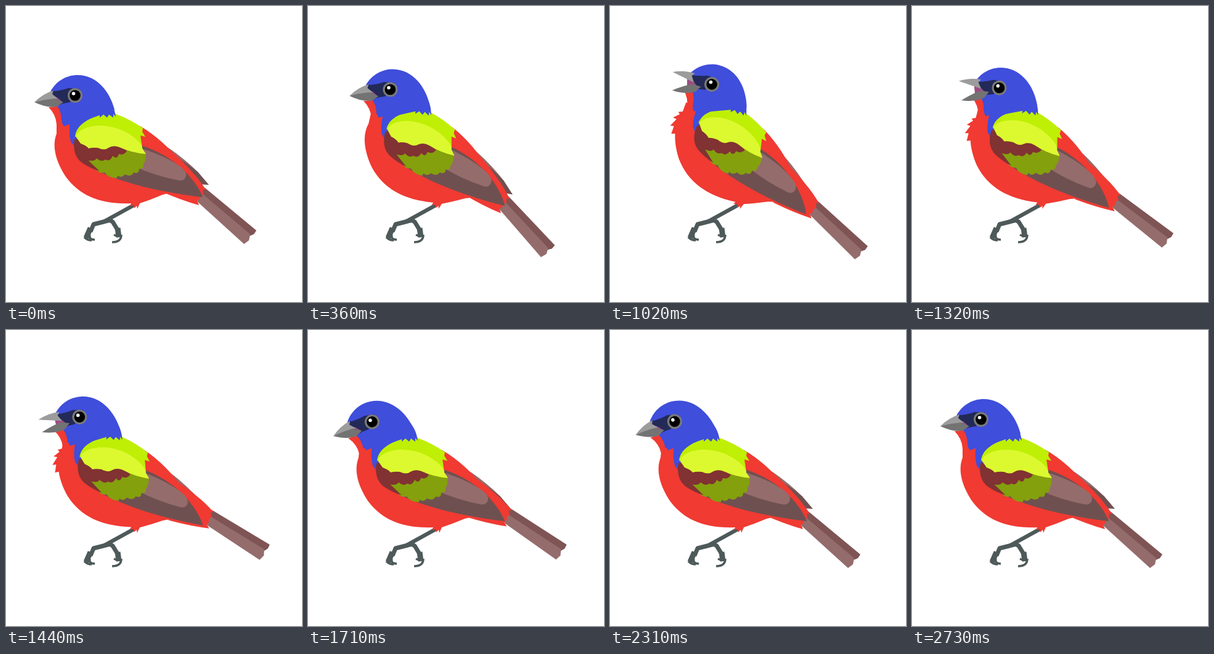
An HTML page for the animation above (3570 ms loop, 480 by 480 pixels).

```html
<!DOCTYPE html>
<html lang="en">
<head>
<meta charset="utf-8">
<title>Singing bird</title>
<style>
  html, body { margin: 0; width: 100%; height: 100%; overflow: hidden; background: #fff; }
  svg { display: block; width: 100%; height: 100%; }
  .red { fill: #f03a32; }
  .blue { fill: #3f4edb; }
  .dark { fill: #6f5050; }
  .light { fill: #946c6c; }
  .leg { fill: none; stroke: #4e5959; stroke-linejoin: round; }
</style>
</head>
<body>
<svg viewBox="0 0 480 480">
  <g class="leg">
    <path stroke-width="6.5" d="M209 322L160 349"/>
    <path stroke-width="7" d="M173 346L154 351 142 354 137 366M166 346L173 350 181 363"/>
    <path stroke-width="9" d="M137 360L130 376M181 360L183 375"/>
    <path stroke-width="3.5" d="M136 371Q134 379 144 379M127 375Q132 380 139 380M175 371L182 374M187 371Q187 383 172 383"/>
  </g>
  <g id="body">
    <path class="light" d="M262 229Q290 248 312 270L300 280Z"/>
    <path class="dark" d="M268 240Q292 253 312 270L329 290 311 289Z"/>
    <g id="tail">
      <path fill="#7f5454" d="M317 291L324 296 406 364 402 370 395 373 314 312Z"/>
      <path class="light" d="M312 303L319 305 396 370 394 380 386 386 310 317Z"/>
      <path class="red" d="M240 214Q270 233 301 268Q314 282 324 298L319 298 320 305 315 308 314 313 310 316 313 323Q284 315 250 300Z"/>
    </g>
    <path class="red" d="M84 185L82 207C74 228 81 252 97 277C120 308 154 322 203 320L201 324 207 323 208 328 212 324 213 329 217 320Q235 314 254 306L280 300 286 256Q255 217 218 195L150 180Z"/>
    <path id="tuft" class="red" d="M92 197L76 203 79 206 70 214 76 215 69 228 75 227 74 240 81 238 95 250 100 200Z"/>
    <g id="throat">
      <path class="red" d="M69 164Q81 176 82 192L82 207 95 210 108 195 90 162Z"/>
    </g>
    <path class="blue" d="M104 188Q101 205 105 220L114 232 130 215 152 177 120 183Z"/>
    <path class="dark" d="M110 220C110 246 124 255 150 268C190 287 250 302 319 310C312 290 282 246 219 226L150 215Z"/>
    <path class="light" d="M216 230Q256 242 281 259Q293 267 292 275Q290 284 281 283Q240 275 208 260Z"/>
    <path fill="#84a00d" d="M140 248L134 251Q136 258 146 264Q148 272 160 270Q166 279 180 279L181 275Q187 280 193 273Q203 278 207 270Q216 273 216 264Q224 265 223 256Q228 250 226 238L185 232Z"/>
    <path fill="#813232" d="M111 216Q107 242 123 254Q136 263 152 268L133 250Q143 253 147 247Q155 254 161 249Q169 253 173 243Q180 250 183 240Q191 243 196 235L178 222 120 214Z"/>
    <path fill="#bfef05" d="M112 212C114 191 137 181 158 175L178 175Q202 184 222 198L221 204 226 212 218 210 221 230 190 222Z"/>
    <path fill="#dcf930" d="M114 213C113 202 134 194 152 194C184 194 208 211 217 222Q221 227 221 231L227 240Q203 238 184 229Q174 225 166 230Q160 235 149 230Q140 229 134 231Q130 226 121 223Z"/>
    <g id="neck">
      <path class="blue" d="M178 180Q175 156 158 144L120 140 85 163Q91 176 91 190L94 195 105 191 122 188 138 182 152 177 152 181 158 176 164 181 167 176 174 181 174 175Z"/>
      <g id="head">
        <path class="blue" d="M72 139C82 120 100 112 116 112C148 112 169 140 176 168L120 180 90 185Q90 171 83 162Z"/>
        <path fill="#232a57" d="M71 143L75 137 80 138Q94 136 101 133L119 134 111 140 104 156 93 158 82 162 74 158Z"/>
        <path fill="#9d4c83" d="M71 144L84 149 92 156 74 160Z"/>
        <path id="upper" fill="#9c9c9c" d="M46 156Q60 142 77 137L75 143 84 150 78 151Z"/>
        <path id="lower" fill="#737373" d="M46 156Q60 152 79 150L93 156 83 163Q67 166 46 156Z"/>
        <circle cx="112" cy="145" r="12" fill="#7a7a7a"/>
        <circle cx="112" cy="145" r="8.8"/>
        <circle cx="109.5" cy="142" r="2.8" fill="#fff"/>
      </g>
    </g>
  </g>
</svg>
<script>
const LOOP = 3570, STEP = 30;
const easeOut = u => 1 - (1 - u) ** 2;
const smooth = u => u * u * (3 - 2 * u);

function pose(id, transform) {
  document.getElementById(id).setAttribute('transform', transform);
}

function draw(now) {
  const time = Math.floor(now % LOOP / STEP) * STEP;
  const ramp = (from, to, ease) =>
    ease(Math.min(1, Math.max(0, (time - from) / (to - from))));

  const lift = ramp(270, 570, easeOut) - ramp(1230, 1650, easeOut);
  const tail = ramp(300, 690, smooth) - ramp(1500, 1950, smooth);
  const dip = ramp(150, 300, smooth) - 0.9 * ramp(300, 570, easeOut)
    + 0.9 * ramp(1230, 1770, easeOut) - ramp(2280, 2730, easeOut);
  const beak = 25 * (ramp(690, 1230, easeOut) - ramp(1230, 1710, smooth));
  const puff = ramp(300, 570, smooth) - ramp(1440, 1650, smooth);

  const shift = `translate(${5.6 * lift} ${0.4 * lift})`;
  const nod = `rotate(${-10.8 * dip} 129 190)`;
  pose('body', `rotate(${15 * lift} 212 320)`);
  pose('tail', `rotate(${-12.5 * tail} 280 244)`);
  pose('tuft', `translate(${11 * (1 - puff)} 0)`);
  pose('throat', shift + nod);
  pose('neck', shift);
  pose('head', nod);
  pose('upper', `rotate(${beak} 86 147)`);
  pose('lower', `rotate(${-beak} 86 147)`);
}

const start = performance.now();
function tick() {
  draw(performance.now() - start);
  requestAnimationFrame(tick);
}
tick();
</script>
</body>
</html>
```
